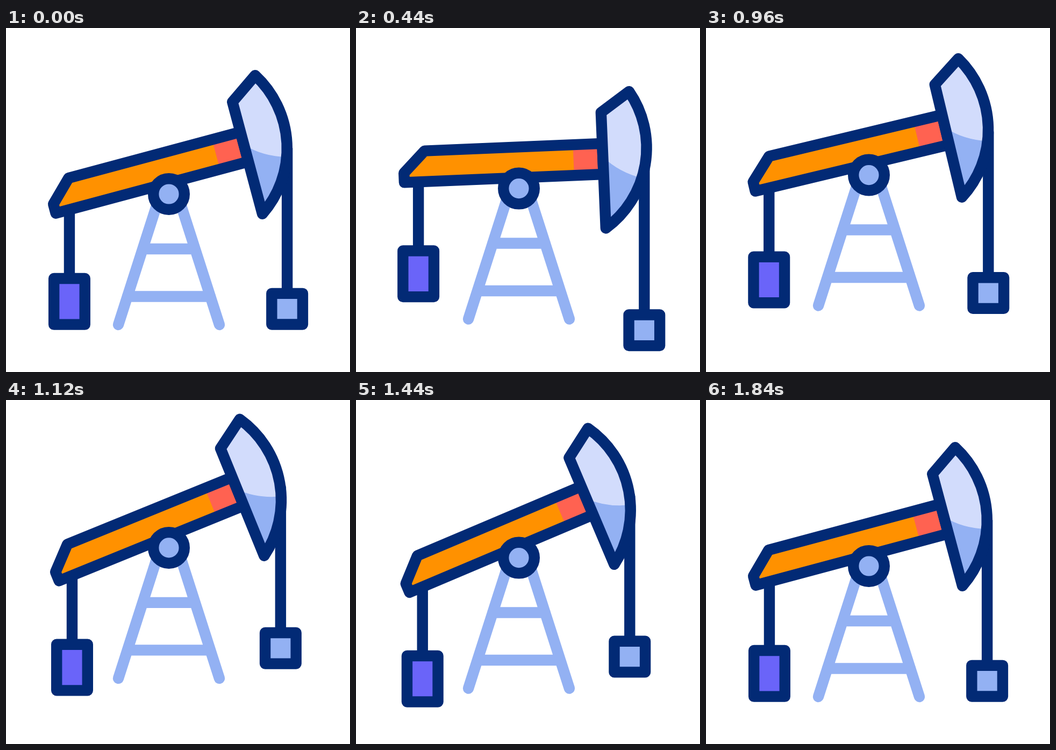
An HTML page with a canvas that plays this animation: 640x640 px, repeating every 2 s.

```html
<!DOCTYPE html>
<html lang="en">
<head>
<meta charset="utf-8">
<title>Pump jack</title>
<style>
  html, body { margin: 0; width: 100%; height: 100%; overflow: hidden; background: #fff; }
  canvas { display: block; width: 100vmin; height: 100vmin; }
</style>
</head>
<body>
<canvas id="stage"></canvas>
<script>
const SIZE = 640, LOOP = 2000, STEP = 40, LINE = 20.4, DEG = Math.PI / 180;
const NAVY = '#022a75', BLUE = '#93b1f3', PALE = '#d2dcfc';
const ORANGE = '#ff9100', RED = '#ff6251', PURPLE = '#6a64f9';

const canvas = document.getElementById('stage');
const ctx = canvas.getContext('2d');
const ratio = window.devicePixelRatio || 1;
canvas.width = canvas.height = SIZE * ratio;

// Symmetric cubic-bezier(k, 0, 1 - k, 1), solved by bisection
function ease(x, k) {
  x = Math.min(1, Math.max(0, x));
  let lo = 0, hi = 1;
  for (let i = 0; i < 24; i++) {
    const s = (lo + hi) / 2, r = 1 - s;
    const bx = 3 * k * s * r * r + 3 * (1 - k) * s * s * r + s * s * s;
    if (bx < x) lo = s; else hi = s;
  }
  return lo * lo * (3 - 2 * lo);
}

const move = (t, from, to, by, k) => by * ease((t - from) / (to - from), k);

const REST = 15, LOW = 0.3, HIGH = 23.9, END = 1840;
const tilt = t => REST
  + move(t, 80, 604, LOW - REST, 0.6)
  + move(t, 604, 1284, HIGH - LOW, 0.6)
  + move(t, 1284, END, REST - HIGH, 0.6);
const lift = t => move(t, 90, 984, -35.5, 0.5) + move(t, 984, END, 35.5, 0.5);

function stroke(path, color) {
  ctx.strokeStyle = color;
  ctx.stroke(path);
}

function fill(path, color) {
  ctx.fillStyle = color;
  ctx.fill(path);
}

// All shapes are relative to the pivot, with the beam level
const TOP = -77.2, BOTTOM = -20, HEAD = 158.6, TAIL = -212.4;

const beam = new Path2D();
beam.moveTo(HEAD, BOTTOM);
beam.lineTo(TAIL, BOTTOM);
beam.lineTo(TAIL, BOTTOM - 17.6);
beam.lineTo(TAIL + 40, TOP);
beam.lineTo(HEAD, TOP);
beam.closePath();

const tip = new Path2D();
tip.rect(103.8, TOP, HEAD - 103.8, BOTTOM - TOP);

const bow = { x: 55.7, y: -73.2, r: 185 };
const head = new Path2D();
head.arc(bow.x, bow.y, bow.r, -32.2 * DEG, 56.2 * DEG);
head.lineTo(HEAD, -135);
head.closePath();

const shade = new Path2D();
shade.moveTo(HEAD, -52.5);
shade.quadraticCurveTo(187, -22, 232, -9);
shade.lineTo(HEAD + 90, 90);
shade.lineTo(HEAD, 90);
shade.closePath();

const hub = new Path2D();
hub.arc(0, 0, 28.8, 0, 2 * Math.PI);

const stand = new Path2D();
const legX = y => 16 + 0.321 * y;
for (const side of [-1, 1]) {
  stand.moveTo(side * legX(0), 0);
  stand.lineTo(side * legX(243), 243);
}
for (const y of [102, 190.5]) {
  stand.moveTo(-legX(y), y);
  stand.lineTo(legX(y), y);
}

// A box hanging straight down from a point of the tilted beam
function weight(x, y, a, drop, h, color) {
  const w = 57.6;
  const px = x * Math.cos(a) + y * Math.sin(a);
  const py = y * Math.cos(a) - x * Math.sin(a);
  const top = py + drop - h / 2;
  const rope = new Path2D(), box = new Path2D();
  rope.moveTo(px, py);
  rope.lineTo(px, top);
  box.rect(px - w / 2, top, w, h);
  stroke(rope, NAVY);
  fill(box, color);
  stroke(box, NAVY);
}

function draw(t) {
  const a = tilt(t) * DEG;
  ctx.setTransform(ratio, 0, 0, ratio, 0, 0);
  ctx.fillStyle = '#fff';
  ctx.fillRect(0, 0, SIZE, SIZE);
  ctx.lineWidth = LINE;
  ctx.lineCap = ctx.lineJoin = 'round';
  ctx.translate(303, 309 + lift(t));

  stroke(stand, BLUE);
  weight(-186.2, BOTTOM, a, 171, 85.6, PURPLE);
  weight(234.6, -25, a, 298.5, 57.6, BLUE);

  ctx.save();
  ctx.rotate(-a);
  fill(beam, ORANGE);
  fill(tip, RED);
  stroke(beam, NAVY);
  fill(head, PALE);
  ctx.save();
  ctx.clip(head);
  fill(shade, BLUE);
  ctx.restore();
  stroke(head, NAVY);
  ctx.restore();

  fill(hub, BLUE);
  stroke(hub, NAVY);
}

const start = performance.now();
function tick() {
  const t = (performance.now() - start) % LOOP;
  draw(Math.floor(t / STEP) * STEP);
  requestAnimationFrame(tick);
}
tick();
</script>
</body>
</html>
```
